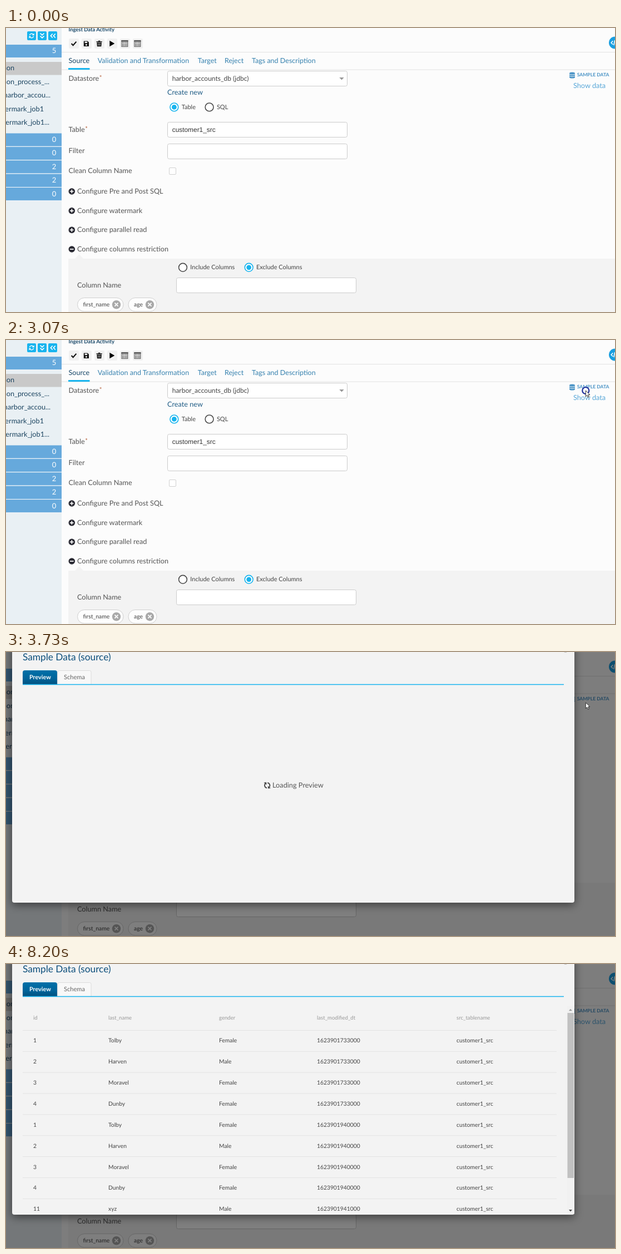
These frames come from a looping animation (1095 by 511 pixels, 8990 ms). An HTML page:

```html
<!DOCTYPE html>
<html lang="en">
<head>
<meta charset="utf-8">
<title>Sample data preview</title>
<style>
html, body { margin: 0; width: 100%; height: 100%; overflow: hidden; background: #fcfcfc; }
svg { display: block; width: 100vw; height: 100vh; }
text { font-family: Lato, sans-serif; text-rendering: geometricPrecision; white-space: pre; }
</style>
</head>
<body>
<svg id="stage" viewBox="0 0 1095 511" preserveAspectRatio="none">
  <defs>
    <linearGradient id="tab" x2="0" y2="1">
      <stop offset="0" stop-color="#0070a8"/><stop offset=".6" stop-color="#00649a"/><stop offset="1" stop-color="#00517f"/>
    </linearGradient>
    <filter id="blur" x="-10%" y="-10%" width="120%" height="120%"><feGaussianBlur stdDeviation="8"/></filter>
    <clipPath id="body"><rect x="11" y="60" width="1011" height="390"/></clipPath>
    <g id="refresh">
      <path d="M-4.6 -1A4.7 4.7 0 0 1 3.6 -3M4.6 1A4.7 4.7 0 0 1 -3.6 3" fill="none" stroke="currentColor" stroke-width="1.8"/>
      <path d="M5.8 -5.6V-.9H1.1ZM-5.8 5.6V.9H-1.1Z" fill="currentColor"/>
    </g>
  </defs>
  <g id="page"></g>
  <rect id="shade" width="1095" height="511"/>
  <g id="dialog"></g>
  <g id="pointer">
    <circle id="halo" r="21" fill="none" stroke="#f2ea25" stroke-width="3.2"/>
    <circle id="ring" fill="none" stroke-width="2.2"/>
    <path d="M0 0V10.6L2.5 8.3L4.2 12.1L6 11.3L4.3 7.6H7.7Z" fill="#fff" stroke="#222" stroke-width=".9"/>
  </g>
</svg>
<script>
const LOOP = 8990, CYAN = '#18b4ee', BLUE = '#3782af', NAVY = '#164667', GREY = '#555';
const $ = id => document.getElementById(id);

const text = (x, y, s, size = 12.7, fill = GREY, extra = '') =>
  `<text x="${x}" y="${y}" font-size="${size}" fill="${fill}" ${extra}>${s}</text>`;
const rect = (x, y, w, h, fill, extra = '') =>
  `<rect x="${x}" y="${y}" width="${w}" height="${h}" fill="${fill}" ${extra}/>`;
const line = (d, stroke, width = 1, extra = '') =>
  `<path d="${d}" fill="none" stroke="${stroke}" stroke-width="${width}" ${extra}/>`;
const shape = (d, fill) => `<path d="${d}" fill="${fill}"/>`;
const disc = (x, y, r, fill, extra = '') => `<circle cx="${x}" cy="${y}" r="${r}" fill="${fill}" ${extra}/>`;
const field = (x, y) => rect(x + .5, y + .5, 323, 27, '#fff', 'rx="3" stroke="#cbcbcb"');

function radio(x, y, on, label) {
  const color = on ? CYAN : '#4a4a4a';
  return disc(x, y, 7.4, '#fff', `stroke="${color}" stroke-width="1.6"`) +
    (on ? disc(x, y, 4.4, CYAN) : '') + text(x + 13.3, y + 3.6, label, 11, '#444');
}

function fold(y, open, label) {
  return disc(118.3, y, 5.8, '#2a2a33') +
    line(`M115 ${y}h6.6${open ? '' : `m-3.3 -3.3v6.6`}`, '#fff', 1.7) +
    text(128, y + 3.8, label);
}

function chip(x, w, label) {
  const cx = x + w - 13;
  return rect(x + .5, 485.5, w - 1, 24.5, '#fdfdfd', 'rx="12.2" stroke="#cfcfcf"') +
    text(x + 10.5, 501, label, 10.4, '#444') + disc(cx, 497.7, 7.7, '#a9a9a9') +
    line(`M${cx - 3} 494.7l6 6m0 -6l-6 6`, '#fff', 1.7);
}

function sidebar() {
  let s = rect(0, 0, 100, 511, '#e9f0f4');
  [38, 57, 76].forEach(x => s += rect(x, 6, 16, 16, CYAN, 'rx="2"'));
  s += '<use href="#refresh" color="#fff" transform="translate(46 14) scale(.8)"/>';
  s += line('M61.5 9.5l3.5 3.3 3.5-3.3m-7 5l3.5 3.3 3.5-3.3M83.7 10.5l-3.3 3.5 3.3 3.5m5-7l-3.3 3.5 3.3 3.5', '#fff', 1.7);
  const band = (y, n) => s += rect(0, y, 100, 23.3, '#66a9dc') +
    line(`M0 ${y + 23.8}H100`, '#f4f8fb') + text(82.8, y + 15.4, n, 13, '#fff');
  band(30, 5);
  s += rect(0, 61, 100, 23.5, '#c9c9c9');
  [['json', 15], ['json_process_...', 78], ['harbor_accou...', 80], ['watermark_job1', 68], ['watermark_job1...', 78]]
    .forEach(([name, end], i) => s += text(end, 76.3 + 24.4 * i, name, 12.7, '#1b4460', 'text-anchor="end"'));
  [0, 0, 2, 2, 0].forEach((n, i) => band(189.5 + 24.4 * i, n));
  return s;
}

function toolbar() {
  let s = text(112.5, 6, 'Ingest Data Activity', 9.4, NAVY, 'font-weight="700"');
  for (let i = 0; i < 6; i++) s += rect(113 + 23 * i, 19, 18, 18, '#f1f1f1', 'rx="2"');
  s += line('M117.6 28l3 3.2 5.8-6.6', '#111', 2.1);
  s += shape('M139.8 23.5h7l2.2 2.2v7.3h-9.2z', '#111') + rect(141.6, 24.5, 4.6, 2.6, '#f1f1f1') + disc(144.4, 30.2, 1.5, '#f1f1f1');
  s += shape('M162.5 24h3l.8-1.3h2.6l.8 1.3h3v1.5h-10.2zM163.3 26.3h8.6l-.6 7h-7.4z', '#111') +
    line('M165.8 27.7v4m1.8-4v4m1.8-4v4', '#ddd', .7);
  s += shape('M186.3 22.8l9 5.2-9 5.2z', '#000');
  [207.5, 230.5].forEach(x => {
    s += rect(x + .4, 22.4, 11, 11, '#fff', 'stroke="#444" stroke-width=".9"') + rect(x, 22, 12, 2.6, '#555');
    s += line([26, 28.7, 31.4].map(y => `M${x + 1.5} ${y}h9`).join(''), '#444', 1.6, 'stroke-dasharray="1.7 .8"');
  });
  s += line('M100 43.5H1095M100 75H1095', '#e2e2e2');
  s += rect(112, 72, 38.5, 3, CYAN);
  [['Source', 112.5], ['Validation and Transformation', 164.7], ['Target', 344.7], ['Reject', 393], ['Tags and Description', 442]]
    .forEach(([name, x], i) => s += text(x, 63, name, 12.55, i ? BLUE : NAVY));
  s += disc(1095, 26.5, 11, '#1a9fe0') + line('M1091.3 23.3l-3.2 3.2 3.2 3.2M1094.8 22l-2 9', '#fff', 1.5);
  return s;
}

function form() {
  const star = x => `<tspan fill="#b0552c" font-size="11" dx="${x}" dy="-2">*</tspan>`;
  let s = text(112.5, 94.5, 'Datastore' + star(.5)) + field(290, 77) +
    text(298.7, 94.7, 'harbor_accounts_db (jdbc)', 12, '#444') + shape('M599.3 89h8.4l-4.2 4.4z', '#999');
  s += text(290, 120, 'Create new', 12.7, '#1f5c85');
  s += radio(302.4, 142.4, true, 'Table') + radio(365.6, 142.4, false, 'SQL');
  s += text(112.5, 187, 'Table' + star(.5)) + field(290, 169) +
    text(298.7, 187, 'customer1_src', 11.9, '#333', 'style="font-family:\'Liberation Sans\',sans-serif"');
  s += text(112.5, 225.3, 'Filter') + field(290, 208);
  s += text(112.5, 260.7, 'Clean Column Name') + rect(293.5, 251.5, 12, 12, '#fff', 'rx="1.5" stroke="#d0d0d0"');
  s += fold(294, false, 'Configure Pre and Post SQL') + fold(328.8, false, 'Configure watermark') +
    fold(363.4, false, 'Configure parallel read') + fold(398, true, 'Configure columns restriction');
  s += shape('M112 415h12l7.5-8 7.5 8H1095v96H112z', '#f3f3f3');
  s += radio(318, 430.8, false, 'Include Columns') + radio(436.7, 430.8, true, 'Exclude Columns');
  s += text(128, 467, 'Column Name') + field(306, 449) + chip(128, 83.5, 'first_name') + chip(219.5, 52, 'age');
  s += shape('M1013 81.5a5 2 0 0 1 10 0v7a5 2 0 0 1-10 0z', '#4b94c6') +
    line('M1013 83.2q5 2.4 10 0m-10 3.1q5 2.4 10 0', '#fcfcfc', .9);
  s += text(1026.7, 87.2, 'SAMPLE DATA', 8.6, '#4b94c6', 'font-weight="700"');
  return s + text(1020, 108.4, 'Show data', 12.7, '#58a7d8', 'id="show"');
}

function grid() {
  const cols = [49, 184, 383, 559, 810];
  const people = ['Tolby', 'Harven', 'Moravel', 'Dunby'];
  let s = '';
  ['id', 'last_name', 'gender', 'last_modified_dt', 'src_tablename']
    .forEach((h, i) => s += text(cols[i], 99.6, h, 9.6, '#999'));
  for (let r = 0; r < 9; r++) {
    const last = r === 8, k = r % 4;
    const row = [last ? 11 : k + 1, last ? 'xyz' : people[k], last || k === 1 ? 'Male' : 'Female',
      '1623901' + (last ? 941 : r < 4 ? 733 : 940) + '000', 'customer1_src'];
    s += line(`M30 ${119.5 + 37.85 * r}H990`, '#e3e3e3');
    row.forEach((v, i) => s += text(cols[i], 141.4 + 37.85 * r, v, 10.3, '#444'));
  }
  s += rect(1009, 76, 12.5, 374, '#f1f1f1') + rect(1009.5, 88, 11.5, 297, '#c1c1c1');
  s += shape('M1012 84.2h6l-3-3.4z', '#999') + shape('M1012 442h6l-3 3.4z', '#444');
  return s;
}

function dialog() {
  let s = rect(11, -20, 1011, 475, '#000', 'opacity=".5" filter="url(#blur)"');
  s += rect(11, -20, 1011, 471, '#f3f3f3', 'rx="4"');
  s += text(30, 15.2, 'Sample Data (source)', 17.3, '#0d4f7c') + disc(1006, -4, 5, '#b5b5b5');
  s += shape('M93 58V36q0-2.5 2.5-2.5h55q2.5 0 2.5 2.5V58', '#f8f8f8') +
    line('M93 58V36q0-2.5 2.5-2.5h55q2.5 0 2.5 2.5V58', '#dcdcdc');
  s += shape('M30 58V37q0-4 4-4h54q4 0 4 4v21z', 'url(#tab)');
  s += text(42, 49.2, 'Preview', 10.8, '#fff', 'font-weight="700"') + text(104, 49.2, 'Schema', 11.1, '#666');
  s += line('M30 58.5H1003', CYAN, 1.7);
  s += `<g id="loading" color="#444"><use id="spin" href="#refresh"/>${text(479, 244.2, 'Loading Preview', 12.75)}</g>`;
  return s + `<g id="grid" clip-path="url(#body)">${grid()}</g>`;
}

$('page').innerHTML = rect(0, 0, 1095, 511, '#fcfcfc') + sidebar() + toolbar() + form();
$('dialog').innerHTML = dialog();

// Pointer path: time, x, y
const path = [
  [500, 704, -26], [600, 712, 106], [680, 722, 125], [900, 830, 112], [1000, 882, 113],
  [1100, 942, 112], [1230, 1005, 102], [1400, 1060, 104], [1600, 1051, 115], [1800, 1045.5, 112.5],
  [2000, 1045.5, 112.5], [2530, 1046, 98.5], [2869, 1046, 98.5], [2870, 1042.3, 91],
  [5600, 1042.3, 91], [5980, 1037, -28]
];
const clamp = v => Math.max(0, Math.min(1, v));

function place(t) {
  let i = 1;
  while (i < path.length - 1 && t > path[i][0]) i++;
  const [t0, x0, y0] = path[i - 1], [t1, x1, y1] = path[i];
  const k = clamp((t - t0) / (t1 - t0));
  return [x0 + (x1 - x0) * k, y0 + (y1 - y0) * k];
}

const set = (id, attr, value) => $(id).setAttribute(attr, value);
const show = (id, on) => set(id, 'display', on ? 'inline' : 'none');

function draw(t) {
  const fade = clamp((t - 3080) / 211), loaded = t >= 5600;
  set('shade', 'opacity', .5 * fade);
  set('dialog', 'opacity', fade);
  show('dialog', fade > 0);
  show('loading', !loaded);
  show('grid', loaded);
  show('show', t < 3130 || loaded);
  set('spin', 'transform', `translate(469.7 240) rotate(${(t - 3270) * .18})`);

  const [x, y] = place(t);
  show('pointer', t >= 530 && t < 5980);
  set('pointer', 'transform', `translate(${x} ${y})`);
  show('halo', t < 3070);
  const click = (t - 3070) / 400;
  show('ring', click >= 0 && click < 1);
  set('ring', 'r', 6 + 4 * clamp(click));
  set('ring', 'stroke', click < .3 ? '#1b2c9c' : '#3d55d6');
  set('ring', 'opacity', 1 - clamp(click) * .8);
}

const start = performance.now();
function tick() {
  draw((performance.now() - start) % LOOP);
  requestAnimationFrame(tick);
}
tick();
</script>
</body>
</html>
```
